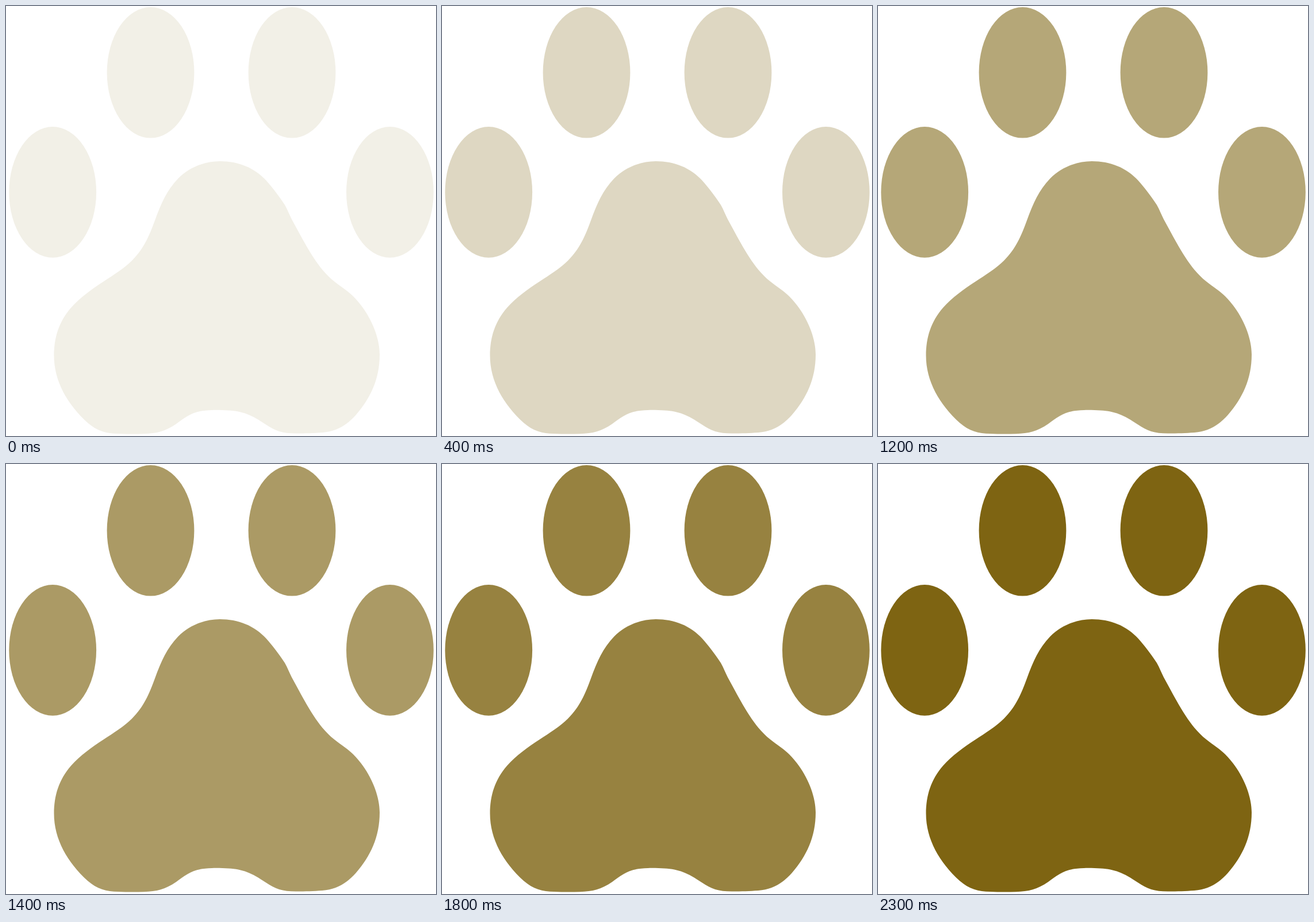
Write an HTML page without scripts that moves like this. It is 748 px wide and 748 px high and loops after 2.4 s.

```html
<!DOCTYPE html>
<html lang="en">
<head>
<meta charset="utf-8">
<title>Paw</title>
<style>
  html, body { margin: 0; width: 100%; height: 100%; overflow: hidden; background: #fff; }
  svg { display: block; width: 100%; height: 100%; }
  .paw { fill: #7e6412; animation: fade 2400ms infinite; }

  /* Eleven 200 ms steps, then a last one of 100 ms */
  @keyframes fade {
    0% { opacity: .1; animation-timing-function: steps(11, end); }
    91.666% { opacity: .961; animation-timing-function: step-end; }
    95.833%, 100% { opacity: 1; }
  }
</style>
</head>
<body>
<svg viewBox="0 0 748 748">
  <defs>
    <ellipse id="toe" rx="75.9" ry="113.8"/>
  </defs>
  <g class="paw">
    <use href="#toe" x="81.2" y="323.9"/>
    <use href="#toe" x="251.5" y="115.8"/>
    <use href="#toe" x="497.5" y="115.8"/>
    <use href="#toe" x="667.9" y="323.9"/>
    <path d="M372 270
      C346 270 318 281 299.5 300
      C280 320 270 343 259 373
      C249 400 240 422 219 443
      C193 469 145 489 113 525
      C92 549 83.5 577 83.5 608
      C83.5 653 107 693 142 725
      C158 739 175 744 195 744
      C210 744.6 225 744.7 240 744.2
      C262 743.5 277 740 296 727
      C314 714 325 703.5 358 703
      C366 702.6 378 703 387 703.5
      C412 705 427 711 452 728
      C468 739 481 743.5 504 743.5
      C522 743.5 535 743 550 742
      C575 740 592 730 609 711
      C634 682 650 649 650 606
      C650 575 633 534 604 505
      C589 490 574 485 555 464
      C533 440 512 398 497 371
      C493 363 490 355 485 346
      C474 329 462 314 453 304
      C432 281 404 270 372 270Z"/>
  </g>
</svg>
</body>
</html>
```
